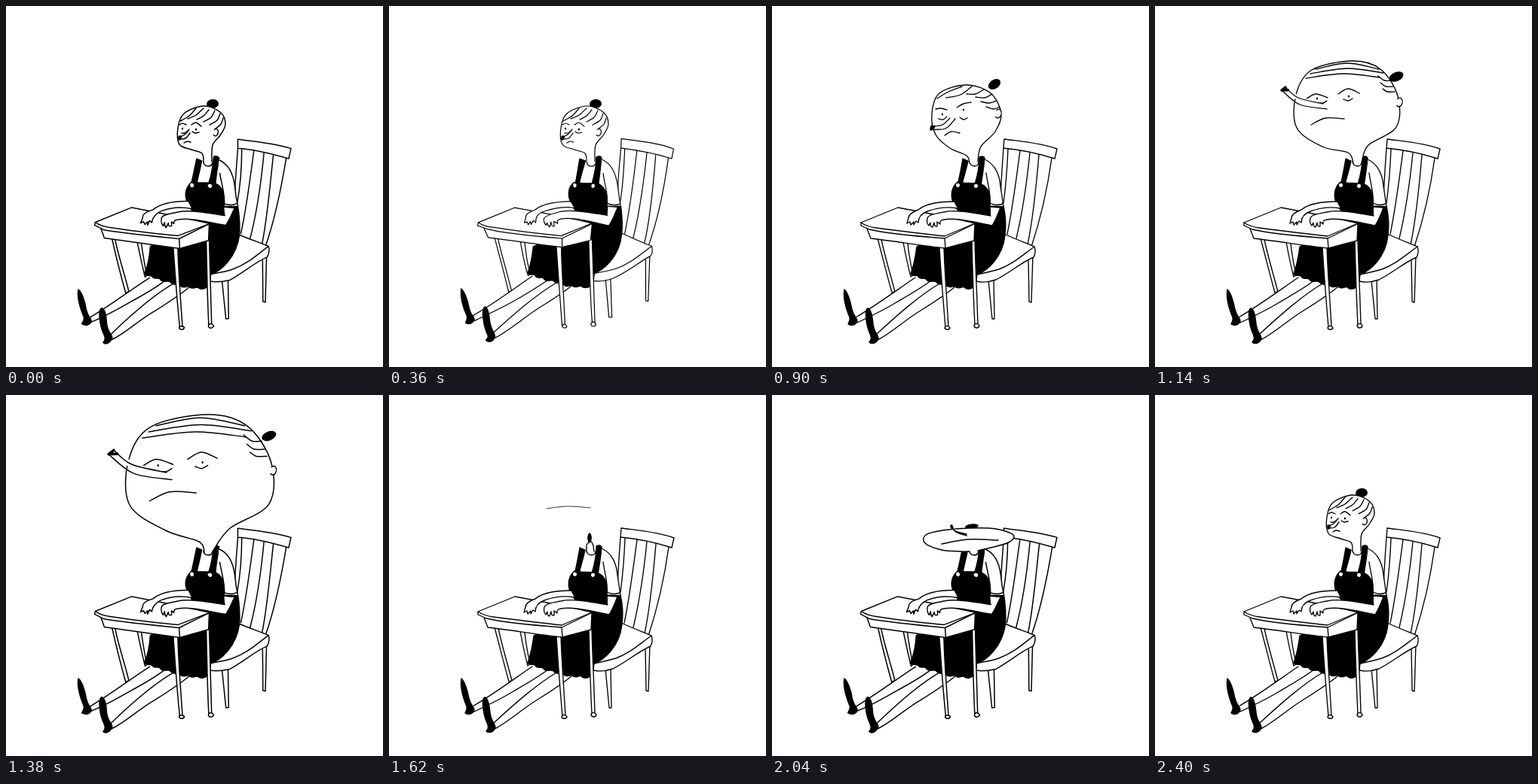
Write an HTML page with a canvas that moves like this. It is 500 px wide and 480 px high and loops after 2.46 s.

```html
<!DOCTYPE html>
<html lang="en">
<head>
<meta charset="utf-8">
<title>Inflating head</title>
<style>
  html, body { margin: 0; width: 100%; height: 100%; overflow: hidden; background: #fff; }
  canvas { display: block; }
</style>
</head>
<body>
<canvas id="stage" width="500" height="480"></canvas>
<script>
const ctx = document.getElementById('stage').getContext('2d');
const STEP = 60, LOOP = 2460;
const INK = '#000', PAPER = '#fff';

// Which of the three line drawings shows at each step
const BOIL = 'ABCACABCABCABABCABACABCABCACABCABCABCABAC';
const WIDTH = { A: 1.5, B: 1.2, C: 1.35 };

// Back to front: [fill, stroke, path]
const BODY = [
  // chair
  [PAPER, INK, 'M340 338 L341 393 L344 394 L346 330'],
  [PAPER, INK, 'M287 364 L292 416 L295 416 L294 362'],
  [null, INK, 'M307 189 C306 205 304 225 303 262 M313 190 C312 215 310 240 307 262 M329 192 C324 230 319 270 312 303 M342 195 C338 235 332 275 324 309 M354 198 C350 245 346 285 339 317 M371 202 C365 245 354 290 344 320'],
  [PAPER, INK, 'M308 177 C330 180 357 182 378 190 L375 203 C350 195 330 191 307 189 Z'],
  [PAPER, INK, 'M308 303 C323 310 339 316 348 320 C350 325 349 330 347 334 C332 340 315 355 297 364 C288 367 279 368 271 366 L272 357 Z'],
  [null, INK, 'M348 320 C330 333 318 344 301 350 C291 353 282 355 272 357'],
  // far desk legs
  [PAPER, INK, 'M140 309 C147 335 153 360 159 381 L163 380 C157 356 149 331 145 310'],
  [PAPER, INK, 'M174 314 C177 330 180 345 184 360 L187 358 C184 343 181 329 180 315'],
  // legs and shoes
  [PAPER, INK, 'M190 361 C165 378 140 397 111 414 L113 421 C130 413 152 402 165 394 C182 384 198 375 211 365'],
  [PAPER, INK, 'M224 368 C195 385 165 412 139 436 L140 444 C158 435 177 417 197 405 C213 395 229 385 243 373'],
  [INK, INK, 'M96 377 C100 380 104 392 106 403 C108 412 112 414 113 418 C112 424 106 426 101 423 C102 420 104 418 103 414 C98 402 94 388 96 377 Z'],
  [INK, INK, 'M127 402 C131 402 133 412 134 422 C135 434 142 438 141 443 C138 449 132 450 129 447 C132 444 132 440 130 436 C125 425 122 404 127 402 Z'],
  // torso and dress
  [PAPER, null, 'M253 204 L262 206 L273 206 L284 206 L292 245 L246 245 Z'],
  [INK, INK, 'M246 234 C239 240 236 250 240 261 C244 269 248 272 250 280 L262 290 L192 320 C190 335 188 345 184 356 C187 361 192 356 194 360 C197 365 203 360 205 364 C208 369 215 364 218 367 C221 373 228 368 231 371 C235 377 241 371 243 373 C247 378 252 372 255 374 C259 378 264 376 267 374 L271 358 C285 352 306 335 309 305 C311 290 309 275 307 266 L290 266 C291 252 287 241 278 237 C268 234 256 237 246 234 Z'],
  [INK, INK, 'M253 203 L260 206 C258 217 254 227 252 238 L246 238 C249 226 251 215 253 203 Z'],
  [INK, INK, 'M275 201 C278 199 281 200 282 202 C281 215 279 226 277 239 L269 237 C273 224 275 212 275 201 Z'],
  [PAPER, INK, 'M282 204 C296 210 302 225 303 240 C305 252 306 260 307 267 L289 266 C291 250 286 238 284 222'],
  [null, INK, 'M289 262 C295 265 301 265 306 263'],
  [null, INK, 'M262 207 C263 214 273 215 274 208'],
  // desk
  [PAPER, INK, 'M222 320 C224 355 227 392 230 427 L234 427 C232 390 229 354 228 320'],
  [PAPER, INK, 'M265 311 C266 350 267 386 269 424 L273 424 C272 386 270 350 269 311'],
  [PAPER, INK, 'M229 428 C230 424 235 425 236 428 C235 431 230 431 229 428 Z M268 425 C269 421 274 422 275 425 C274 429 269 429 268 425 Z'],
  [PAPER, INK, 'M126 296 L131 309 C165 313 200 319 230 322 L268 312 L269 290'],
  [PAPER, INK, 'M118 288 L167 268 C200 274 240 282 270 289 L229 309 C190 306 150 302 129 297 L118 292 Z'],
  [null, INK, 'M118 288 C124 292 130 294 138 295 C168 299 200 303 229 306 L269 289 M229 309 L230 322'],
  // arms
  [PAPER, INK, 'M241 260 C225 260 205 262 194 271 C186 274 181 277 181 282 L179 289 L183 287 L184 291 L188 287 L188 291 L191 286 L194 288 C194 282 198 276 206 273 C220 268 235 267 246 269'],
  [PAPER, INK, 'M290 279 C270 276 245 270 228 274 C218 276 208 277 206 282 C205 286 206 290 208 292 L210 288 C210 291 211 294 213 294 L215 288 C215 292 217 294 219 293 L219 287 L223 290 C222 286 224 285 228 284 C245 281 270 288 292 292 C297 284 300 276 303 268 L290 267'],
  // buttons
  [PAPER, null, 'M244 238 C244 235 249 235 249 238 C249 242 244 242 244 238 Z M268 239 C268 236 273 236 273 239 C273 243 268 243 268 239 Z']
];

function redraw(d, kind) {
  if (kind === 'C') return d;
  const k = kind === 'A' ? 1 : 2;
  return d.replace(/(\d+) (\d+)/g, (_, x, y) => {
    x = +x; y = +y;
    const dx = Math.sin(x * 1.7 * k + y * 0.9) * 0.6;
    const dy = Math.cos(x * 0.8 + y * 1.3 * k) * 0.6;
    const lift = k === 2 ? Math.max(0, y - 260) * 0.012 : 0;
    return `${(x + dx).toFixed(1)} ${(y + dy - lift).toFixed(1)}`;
  });
}

const bodies = {};
for (const kind of 'ABC')
  bodies[kind] = BODY.map(([fill, line, d]) => [fill, line, new Path2D(redraw(d, kind))]);

// Head poses. outline: neck, round the skull, neck. face: lids, eye bags,
// mouth, nose. hair: strands. Every stroke is three points.
const small = {
  outline: [262,207, 260,196, 246,191, 230,184, 228,162, 236,143, 262,133, 284,141, 291,157, 284,172, 274,185, 273,207],
  lines: [230,158,234,156,239,158, 246,158,252,155,259,160, 233,169,237,169,241,166, 247,167,251,169,256,168],
  mouth: [236,182,240,180,245,181],
  nose: [230,174,237,171,243,164, 230,177,238,176,244,169],
  hair: [231,153,243,146,252,136, 241,150,252,145,262,136, 253,151,262,146,269,138, 262,154,272,148,277,139, 270,158,280,152,284,143, 278,163,285,157,288,149],
  eyes: [234,163, 252,164], ear: [278,168,4], bun: [274,130,8,6,-0.1], detail: [1]
};
const mid = {
  outline: [262,209, 258,199, 236,189, 217,171, 212,143, 222,116, 258,105, 290,116, 304,143, 296,167, 277,187, 273,207],
  lines: [217,137,224,136,232,138, 245,135,254,130,264,128, 221,150,227,151,232,147, 249,148,254,151,259,149],
  mouth: [229,172,238,167,249,169],
  nose: [212,160,226,158,236,149, 211,164,230,163,243,150],
  hair: [219,123,234,114,252,107, 231,122,250,118,265,107, 258,117,270,117,281,111, 270,121,282,122,292,117, 277,127,288,129,298,126, 284,134,294,137,302,134],
  eyes: [226,144, 254,138], ear: [300,143,5], bun: [295,104,9,6,-0.6], detail: [1]
};
const big = {
  outline: [263,209, 256,195, 222,187, 188,162, 187,118, 208,85, 262,73, 299,84, 322,120, 320,161, 283,185, 274,208],
  lines: [200,124,213,117,229,122, 243,117,256,110,271,116, 218,129,223,129,228,126, 250,124,256,126,262,123],
  mouth: [207,158,226,149,251,150],
  nose: [173,108,190,122,223,130, 168,112,192,131,228,137],
  hair: [213,84,255,76,297,84, 206,90,255,83,303,89, 200,96,250,90,298,95, 296,93,304,99,313,99, 299,102,306,107,316,107, 302,110,308,114,318,114],
  eyes: [215,123, 257,120], ear: [324,128,5], bun: [320,94,10,6,-0.4], detail: [1]
};

function remap(pose, fx, fy, extra) {
  const out = { detail: pose.detail };
  for (const part of ['outline', 'lines', 'mouth', 'nose', 'hair', 'eyes'])
    out[part] = pose[part].map((v, i) => i % 2 ? fy(v) : fx(v));
  for (const part of ['ear', 'bun'])
    out[part] = [fx(pose[part][0]), fy(pose[part][1]), ...pose[part].slice(2)];
  return Object.assign(out, extra);
}

const huge = remap(big, x => 262 + (x - 258) * 1.4, y => 207 + (y - 207) * 1.35);
huge.outline.splice(0, 4, ...big.outline.slice(0, 4));
huge.outline.splice(-2, 2, ...big.outline.slice(-2));

const tall = remap(small, x => 268 + (x - 268) * 0.8, y => 207 + (y - 207) * 1.42);
const flat = remap(big, x => 201 + (x - 187) * 0.85, y => 177 + (y - 73) * 0.25, {
  outline: [262,208, 250,208, 225,206, 203,197, 204,186, 226,180, 262,177, 297,178, 320,186, 314,196, 290,203, 273,207],
  mouth: [225,198,260,192,300,193],
  nose: [238,174,243,181,258,185, 238,175,244,182,258,187],
  bun: [265,174.5,9,3,-0.1], detail: [0]
});
const seed = remap(small, () => 267, () => 200, {
  outline: [262,208, 262,204, 262,200, 263,198, 264,197, 265,196, 266,195, 268,195, 269,196, 270,198, 271,201, 272,208],
  bun: [266,190,2.6,6.5,0], detail: [0]
});
const stump = { ...seed, bun: [266,202,0,0,0] };

const KEYS = [
  [0, small], [600, small], [900, mid], [1140, big], [1380, huge],
  [1440, stump], [1560, stump], [1620, seed], [1860, tall],
  [2040, flat], [2220, small], [LOOP, small]
];

function poseAt(t) {
  const n = KEYS.findIndex(k => k[0] > t);
  const [t0, a] = KEYS[n - 1], [t1, b] = KEYS[n];
  const u = (t - t0) / (t1 - t0), out = {};
  for (const part in a) out[part] = a[part].map((v, i) => v + (b[part][i] - v) * u);
  return out;
}

// Smooth curve through a flat list of points
function curve(p) {
  const n = p.length / 2;
  const at = i => { i = Math.max(0, Math.min(n - 1, i)); return [p[2 * i], p[2 * i + 1]]; };
  ctx.beginPath();
  ctx.moveTo(p[0], p[1]);
  for (let i = 0; i < n - 1; i++) {
    const a = at(i - 1), b = at(i), c = at(i + 1), d = at(i + 2);
    ctx.bezierCurveTo(
      b[0] + (c[0] - a[0]) / 6, b[1] + (c[1] - a[1]) / 6,
      c[0] - (d[0] - b[0]) / 6, c[1] - (d[1] - b[1]) / 6, c[0], c[1]);
  }
}

function strokes(list) {
  for (let i = 0; i < list.length; i += 6) {
    curve(list.slice(i, i + 6));
    ctx.stroke();
  }
}

function blob(x, y, rx, ry, turn, fill) {
  ctx.beginPath();
  ctx.ellipse(x, y, rx, ry, turn, 0, Math.PI * 2);
  ctx.fillStyle = fill;
  ctx.fill();
}

function drawNose(n) {
  ctx.beginPath();
  ctx.moveTo(n[0], n[1]);
  ctx.quadraticCurveTo(n[2], n[3], n[4], n[5]);
  ctx.lineTo(n[10], n[11]);
  ctx.quadraticCurveTo(n[8], n[9], n[6], n[7]);
  ctx.fillStyle = PAPER;
  ctx.fill();
  strokes(n);
  ctx.save();
  ctx.lineWidth = 3.5;
  ctx.beginPath();
  ctx.moveTo(n[0], n[1]);
  ctx.lineTo(n[6], n[7]);
  ctx.lineTo(n[0] + (n[2] - n[0]) * 0.2, n[1] + (n[3] - n[1]) * 0.2 + 1);
  ctx.stroke();
  ctx.restore();
}

function drawHead(p, whole) {
  const bun = p.bun;
  blob(...bun, INK);
  curve(p.outline);
  ctx.fillStyle = PAPER;
  ctx.fill();
  ctx.stroke();
  if (!whole) {
    blob(...bun, INK);
    return;
  }
  if (p.detail[0] > 0.5) {
    strokes(p.hair);
    strokes(p.lines);
    blob(p.eyes[0], p.eyes[1], 1.2, 1.6, 0, INK);
    blob(p.eyes[2], p.eyes[3], 1.2, 1.6, 0, INK);
    const [x, y, r] = p.ear;
    blob(x, y, r, r, 0, PAPER);
    ctx.beginPath();
    ctx.ellipse(x, y, r * 0.8, r * 1.2, 0.2, -2.4, 2.2);
    ctx.stroke();
  }
  strokes(p.mouth);
  drawNose(p.nose);
}

// Torn skin flies off, the mouth hangs in the air a moment longer
function drawBurst(t) {
  const n = (t - 1440) / STEP;
  ctx.save();
  if (n < 3) {
    const s = 1.1 + n * 0.08;
    const torn = huge.outline.slice(4, -2).map((v, i) => i % 2 ? 112 + (v - 112) * s : 262 + (v - 262) * s);
    ctx.setLineDash([[16, 20], [9, 36], [3, 58]][n]);
    curve(torn);
    ctx.stroke();
    ctx.setLineDash([]);
  }
  ctx.lineWidth = n < 3 ? 1.2 : 0.8;
  strokes([209,151,237,148,267,150]);
  ctx.restore();
}

function draw(t) {
  const kind = BOIL[t / STEP];
  ctx.fillStyle = PAPER;
  ctx.fillRect(0, 0, 500, 480);
  ctx.strokeStyle = INK;
  ctx.lineWidth = WIDTH[kind];
  ctx.lineCap = ctx.lineJoin = 'round';
  for (const [fill, line, path] of bodies[kind]) {
    if (fill) { ctx.fillStyle = fill; ctx.fill(path); }
    if (line) ctx.stroke(path);
  }
  const popped = t >= 1440 && t <= 1620;
  drawHead(poseAt(t), !popped);
  if (popped) drawBurst(t);
}

const start = performance.now();
function tick() {
  const t = (performance.now() - start) % LOOP;
  draw(Math.floor(t / STEP) * STEP);
  requestAnimationFrame(tick);
}
tick();
</script>
</body>
</html>
```
